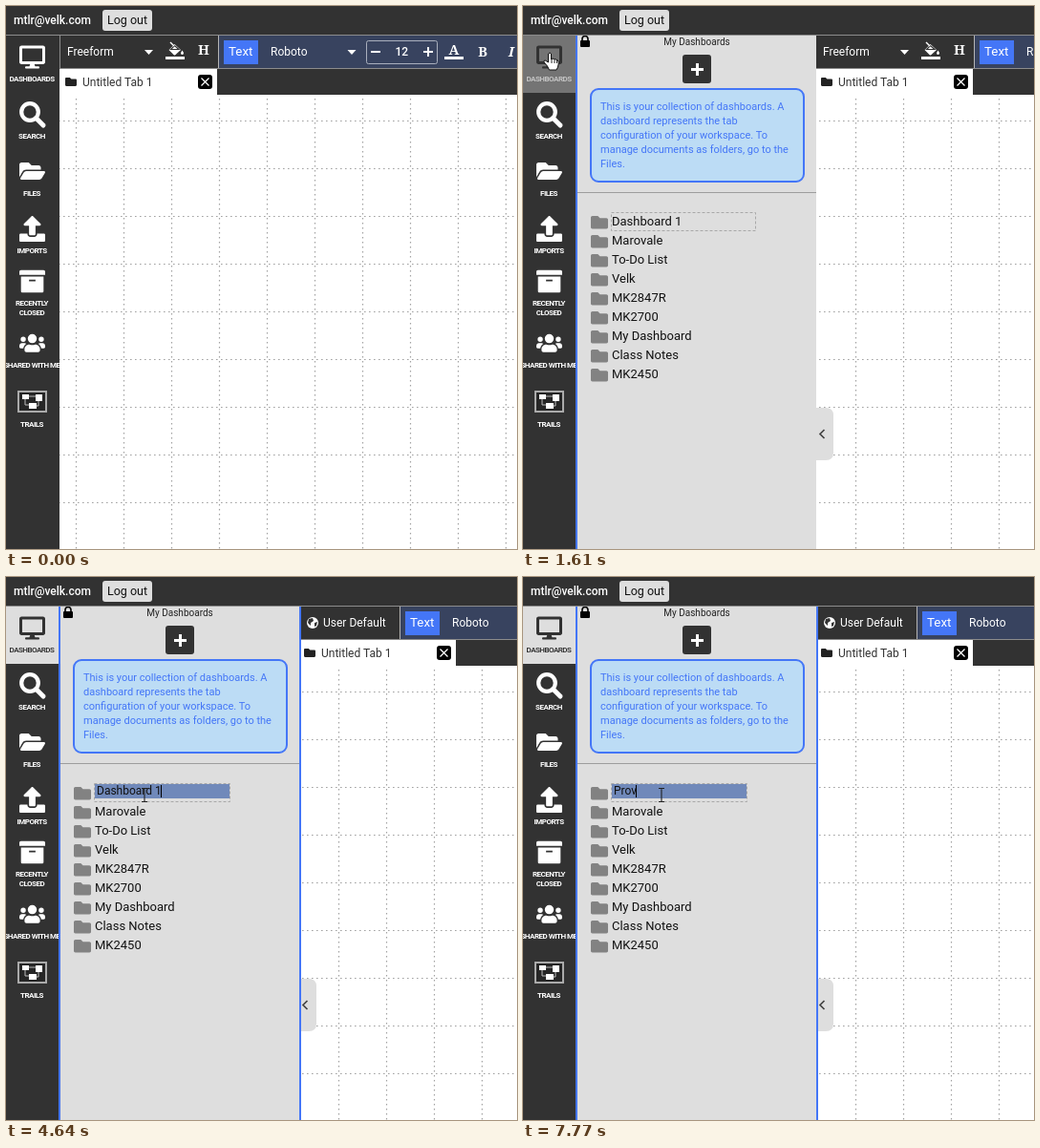
Animation, 535 px wide and 569 px high, one loop 8000 ms. Source, as an HTML page:

```html
<!DOCTYPE html>
<html lang="en">
<head>
<meta charset="utf-8">
<title>Renaming a workspace</title>
<style>
  html, body { margin: 0; width: 100%; height: 100%; overflow: hidden; background: #fff; }
  svg { display: block; position: absolute; left: 0; top: 0; }
  text { font-family: Roboto, sans-serif; font-size: 12px; white-space: pre; }
  .side { font-size: 8px; font-weight: 700; letter-spacing: -.5px; text-anchor: middle; fill: #fff; }
  .slab { font-family: "Noto Serif", serif; font-weight: 800; font-size: 14.5px; fill: #fff; text-anchor: middle; }
  .info { font-size: 11px; fill: #4476f7; }
  .row { font-size: 13px; fill: #111; }
  .w { fill: #fff; }
  .outline { fill: none; stroke: #a8a8a8; stroke-dasharray: 3 2; }
</style>
</head>
<body>
<svg id="stage" width="535" height="569" viewBox="0 0 535 569"></svg>
<script>
const DARK = '#323232', BLUE = '#4476f7', PANEL = '#dedede', LINE = '#8c8c8c';
const LOOP = 8000;

const icons = {
  desktop: 'M528 0H48C21.5 0 0 21.5 0 48v320c0 26.5 21.5 48 48 48h192l-16 48h-72c-13 0-24 11-24 24s11 24 24 24h272c13 0 24-11 24-24s-11-24-24-24h-72l-16-48h192c26.5 0 48-21.5 48-48V48c0-26.5-21.5-48-48-48zm-16 352H64V64h448z',
  open: 'M573 292L500 416A64 64 0 0 1 445 448H45c-18 0-30-20-21-36l73-124A64 64 0 0 1 152 256h400c18 0 30 20 21 36zM152 224h328v-48c0-26-21-48-48-48H272l-64-64H48C21 64 0 85 0 112v278l69-118C86 242 118 224 152 224z',
  upload: 'M296 384h-80c-13 0-24-11-24-24V192h-88c-18 0-27-21-14-34L242 6c8-8 20-8 28 0l152 152c12 13 3 34-14 34h-88v168c0 13-11 24-24 24zm216-8v112c0 13-11 24-24 24H24c-13 0-24-11-24-24V376c0-13 11-24 24-24h136v8c0 31 25 56 56 56h80c31 0 56-25 56-56v-8h136c13 0 24 11 24 24z',
  archive: 'M32 448c0 18 14 32 32 32h384c18 0 32-14 32-32V160H32zm160-224h128v32H192zM480 32H32C14 32 0 46 0 64v64h512V64c0-18-14-32-32-32z',
  users: 'M32 160a64 64 0 1 0 128 0a64 64 0 1 0-128 0zm448 0a64 64 0 1 0 128 0a64 64 0 1 0-128 0zM208 144a112 112 0 1 0 224 0a112 112 0 1 0-224 0zM576 256h-64c-18 0-34 7-45 19 40 22 69 62 75 109h66c18 0 32-14 32-32v-32c0-35-29-64-64-64zM397 288h-8c-42 21-95 21-138 0h-8C180 288 128 340 128 403v29c0 26 21 48 48 48h288c26 0 48-22 48-48v-29c0-63-52-115-115-115zM173 275C161 263 146 256 128 256H64c-35 0-64 29-64 64v32c0 18 14 32 32 32h66c6-47 35-87 75-109z',
  folder: 'M464 128H272l-64-64H48C21 64 0 85 0 112v288c0 26 21 48 48 48h416c26 0 48-22 48-48V176c0-26-22-48-48-48z'
};

const icon = (name, x, y, k, fill = '#fff') =>
  `<path d="${icons[name]}" transform="translate(${x} ${y}) scale(${k})" fill="${fill}" fill-rule="evenodd"/>`;
const rect = (x, y, w, h, fill, extra = '') =>
  `<rect x="${x}" y="${y}" width="${w}" height="${h}" fill="${fill}" ${extra}/>`;
const text = (x, y, s, cls = '', extra = '') =>
  `<text x="${x}" y="${y}" class="${cls}" ${extra}>${s}</text>`;
const stroke = (d, color, width = 2, extra = '') =>
  `<path d="${d}" fill="none" stroke="${color}" stroke-width="${width}" ${extra}/>`;
const group = (id, body) => `<g id="${id}">${body}</g>`;

function grid() {
  let d = '';
  for (let x = -77; x < 560; x += 50) d += `M${x + .5} 97V569`;
  for (let y = 120; y < 569; y += 50) d += `M-80 ${y + .5}H560`;
  return stroke(d, '#a2a2a2', 1.2, 'stroke-dasharray="1.6 3.4"');
}

function freeformBar() {
  return text(64, 52, 'Freeform', 'w') +
    '<path d="M145 46h9l-4.5 5z" fill="#fff"/>' +
    '<path d="M170.5 46l6-6 6.5 6-5.5 5q-1 1-2 0z" fill="#fff"/>' +
    stroke('M172.5 45.5l4-4 4.5 4z', DARK, 1.2) + stroke('M172 38l4 4', '#fff', 1.5) +
    '<path d="M184.5 46.5q3 4 0 4.5q-3-.5 0-4.5z" fill="#fff"/>' +
    rect(167, 53, 20, 3, '#fff') + text(207, 50.5, 'H', 'slab');
}

function userBar() {
  return '<circle cx="71" cy="48" r="6" fill="#fff"/>' +
    '<path d="M67 44l4-1 1 3-3 2v3l-3-3zM73 48l3-1-1 4-2 1z" fill="#323232"/>' +
    text(82, 52, 'User Default', 'w');
}

function textBar() {
  return rect(222, 31, 400, 34, '#38435f') + rect(222, 31, 1, 35, '#b5b5b5') +
    rect(228, 36, 36, 25, BLUE) + text(233, 52, 'Text', 'w', 'style="font-size:13.33px"') +
    text(277, 52, 'Roboto', 'w') + '<path d="M357.5 46h9l-4.5 5z" fill="#fff"/>' +
    rect(377.5, 36.5, 74, 24, 'none', 'rx="2" stroke="#a9afbd"') +
    rect(382, 47, 10, 2, '#fff') + rect(437, 47, 10, 2, '#fff') + rect(441, 43, 2, 10, '#fff') +
    text(407.5, 52, '12', 'w', 'font-weight="500"') +
    text(469, 50.5, 'A', 'slab') + rect(459, 53, 20, 3, '#fff') +
    text(499, 53, 'B', 'slab') + text(529, 53, 'I', 'slab', 'font-style="italic"');
}

function tab() {
  return rect(57, 66, 600, 27, DARK) + rect(57, 66, 164, 28, '#fff') +
    icon('folder', 62, 73.5, .0234, '#222') + text(80, 84, 'Untitled Tab 1', '', 'fill="#333"') +
    rect(201, 72, 15, 15, '#000', 'rx="3"') + stroke('M204.5 75.5l8 8m0-8l-8 8', '#fff', 1.2);
}

function sidebar() {
  const k = 27 / 512, k2 = 27 / 576;
  const labels = [['SEARCH', 139], ['FILES', 199], ['IMPORTS', 259], ['RECENTLY', 314],
    ['CLOSED', 324], ['SHARED WITH ME', 379], ['TRAILS', 441]];
  return rect(0, 31, 56, 538, DARK) +
    '<rect id="button" y="31" width="56" height="60"/>' +
    `<g id="screen">${icon('desktop', 14, 41.5, k2, 'currentColor')}</g>` +
    '<text id="buttonLabel" class="side" x="27" y="79">DASHBOARDS</text>' +
    '<circle cx="25" cy="111" r="8.8" fill="none" stroke="#fff" stroke-width="4.2"/>' +
    stroke('M31.5 117.5l7.5 7.5', '#fff', 5, 'stroke-linecap="round"') +
    icon('open', 14, 161, k2) + icon('upload', 14, 220, k) + icon('archive', 14, 275, k) +
    icon('users', 14, 342.5, 27 / 640) +
    rect(13, 404, 29, 21, '#262626', 'stroke="#aaa" stroke-width="2"') +
    rect(17, 407, 7, 5, '#fff') + rect(31, 407, 7, 7, '#fff') + rect(24, 416, 8, 6, '#fff') +
    stroke('M24 409h7M20 412v6h4M34 414v5h-2', '#bbb', 1) +
    labels.map(([s, y]) => text(27, y, s, 'side')).join('');
}

function panel() {
  const info = ['This is your collection of dashboards. A', 'dashboard represents the tab',
    'configuration of your workspace. To', 'manage documents as folders, go to the', 'Files.'];
  const rows = ['', 'Marovale', 'To-Do List', 'Velk', 'MK2847R', 'MK2700',
    'My Dashboard', 'Class Notes', 'MK2450'];
  return rect(57, 31, 250, 538, PANEL) +
    rect(60, 36, 10, 7, '#000', 'rx="1"') + stroke('M62 37v-2.5a3 3 0 0 1 6 0v2.5', '#000', 1.6) +
    text(182, 41, 'My Dashboards', '', 'text-anchor="middle" fill="#222" style="font-size:10px"') +
    rect(167, 51, 30, 30, DARK, 'rx="3"') +
    rect(176, 65, 13, 3, '#fff') + rect(181, 60, 3, 13, '#fff') +
    rect(71, 87, 223, 97, '#bcdcf5', `rx="8" stroke="${BLUE}" stroke-width="2"`) +
    info.map((s, i) => text(81, 109 + 15 * i, s, 'info')).join('') +
    rect(57, 195, 250, 1, '#9d9d9d') +
    rows.map((s, i) => icon('folder', 71, 217.7 + 20 * i, .0352, '#828282') +
      text(93, 230 + 20 * i, s, 'row')).join('') +
    group('label', text(93, 230, 'Dashboard 1', 'row') + rect(92.5, 216.5, 151, 19, 'none', 'class="outline"')) +
    group('field', rect(92.5, 216.5, 142, 19, 'none', 'class="outline"') + rect(93, 217, 141, 15, '#7089ba') +
      '<rect id="mark" x="95" y="217" height="14" fill="#1677f2"/>' +
      '<text id="input" x="95" y="228"><tspan fill="#fff"></tspan><tspan fill="#111"></tspan></text>' +
      '<rect id="caret" y="218" width="1" height="13" fill="#000"/>') +
    '<path d="M307 421h10q8 0 8 8v39q0 8-8 8h-10z" fill="#dedede"/>' +
    stroke('M315.5 444l-4.5 4.5 4.5 4.5', '#444', 1.7) +
    group('panelEdge', rect(307, 31, 2, 538, BLUE));
}

function pointers() {
  return group('arrow', '<path d="M0 0v16l3.7-3.5 2.5 6 2.6-1.1-2.5-5.9h5.2z" fill="#fff" stroke="#000" stroke-linejoin="round"/>') +
    group('hand', '<path d="M-1.5 1q1.5-2 3 0v6l1-1 2 .5 2 .5 2 1q1 1 .8 3l-.8 4-1.5 3h-7.5l-2-4-3.5-4q-.8-2 1.2-2l3.3 2z" fill="#fff" stroke="#111"/>' +
      stroke('M2 6v5M5 7v4M7.5 8v3', '#111', .9)) +
    group('beam', stroke('M-3-6.5h2.5l.5.5.5-.5H3M0-6V7M-3 7.5h2.5l.5-.5.5.5H3', '#222', 1.1));
}

document.getElementById('stage').innerHTML =
  group('canvas', rect(-100, 90, 760, 480, '#fff') + grid()) +
  group('main', rect(56, 31, 600, 35, DARK) + group('freeform', freeformBar()) +
    group('user', userBar()) + group('format', textBar()) +
    rect(56, 65, 600, 1, LINE) + rect(56, 31, 1, 35, LINE) + tab()) +
  group('panel', panel()) + sidebar() +
  rect(0, 0, 535, 30, DARK) + rect(0, 30, 535, 1, LINE) +
  text(8, 19, 'mtlr@velk.com', 'w', 'font-weight="500"') +
  rect(101, 4, 52, 22, PANEL, 'rx="3"') + text(106, 19, 'Log out', '', 'fill="#111" style="font-size:12.5px"') +
  `<rect id="edge" x="55" width="2" fill="${BLUE}"/>` + pointers();

const el = id => document.getElementById(id);
const show = (id, on) => { el(id).style.display = on ? '' : 'none'; };
const move = (id, x, y = 0) => el(id).setAttribute('transform', `translate(${x} ${y})`);
const size = (id, name, v) => el(id).setAttribute(name, v);

// time, x, y of the pointer's hot spot
const path = [
  [100, 515, 330], [380, 340, 250], [660, 170, 150], [870, 82, 94], [940, 58, 76], [1010, 40, 62],
  [1150, 28, 49], [2200, 28, 49], [2410, 62, 110], [2690, 121, 218], [2830, 124, 221],
  [3110, 124, 221], [3600, 135, 228], [4100, 135, 228], [4240, 145, 228], [5070, 145, 228],
  [5140, 143, 227], [5350, 143, 227], [5420, 145, 228]
];

// time, field text, selected characters, caret
const edits = [
  [4570, 'Dashboard 1', 0, 1], [5100, 'Dashboard 1', 0, 0], [5430, 'Dashboard 1', 9, 0],
  [6160, 'Dashboard 1', 0, 0], [6290, 'Dashboard 1', 9, 0], [6490, 'Dashboard 1', 11, 0],
  [7300, 'P', 0, 1], [7500, 'Pr', 0, 1], [7570, 'Pro', 0, 1], [7770, 'Prov', 0, 1]
];

const lastBefore = (list, t) => list.reduce((found, step, i) => step[0] <= t ? i : found, -1);

function pointerAt(t) {
  t = Math.floor((t - 30) / 70) * 70 + 30;
  const i = Math.max(0, lastBefore(path, t)), a = path[i], b = path[i + 1] || a;
  const k = b === a ? 0 : Math.max(0, (t - a[0]) / (b[0] - a[0]));
  return [1, 2].map(n => Math.round(a[n] + (b[n] - a[n]) * k));
}

function drawField(t) {
  const i = lastBefore(edits, t);
  show('field', i >= 0);
  show('label', i < 0);
  if (i < 0) return;
  const [, value, picked, caret] = edits[i], input = el('input');
  input.children[0].textContent = value.slice(0, picked);
  input.children[1].textContent = value.slice(picked);
  size('mark', 'width', picked ? input.getSubStringLength(0, picked) : 0);
  size('caret', 'x', Math.round(95 + input.getComputedTextLength() - .7));
  show('caret', caret);
}

function draw(t) {
  const open = t >= 1610, active = t >= 1690, user = t >= 3430;
  show('panel', open);
  move('main', open ? 250 : 0);
  move('canvas', open ? 125 : 0);
  show('freeform', !user);
  show('user', user);
  move('format', user ? -60 : 0);
  show('panelEdge', t >= 2430);

  size('button', 'fill', active ? PANEL : open ? '#747474' : DARK);
  el('screen').style.color = open ? DARK : '#fff';
  el('buttonLabel').style.fill = active ? '#222' : open ? '#c4c4c4' : '#fff';
  el('buttonLabel').style.fontWeight = active ? 500 : 700;

  const full = t >= 940;
  show('edge', t >= 170);
  size('edge', 'y', full ? 31 : 66);
  size('edge', 'height', full ? 538 : 503);

  if (open) drawField(t);

  const [x, y] = pointerAt(t);
  const kind = t < 100 ? '' : t >= 3640 ? 'beam' : t >= 1340 && x < 56 ? 'hand' : 'arrow';
  for (const id of ['arrow', 'hand', 'beam']) {
    show(id, id === kind);
    move(id, x, y);
  }
}

let start;
function tick(now) {
  start ??= now;
  draw((now - start) % LOOP);
  requestAnimationFrame(tick);
}
draw(0);
requestAnimationFrame(tick);
</script>
</body>
</html>
```
